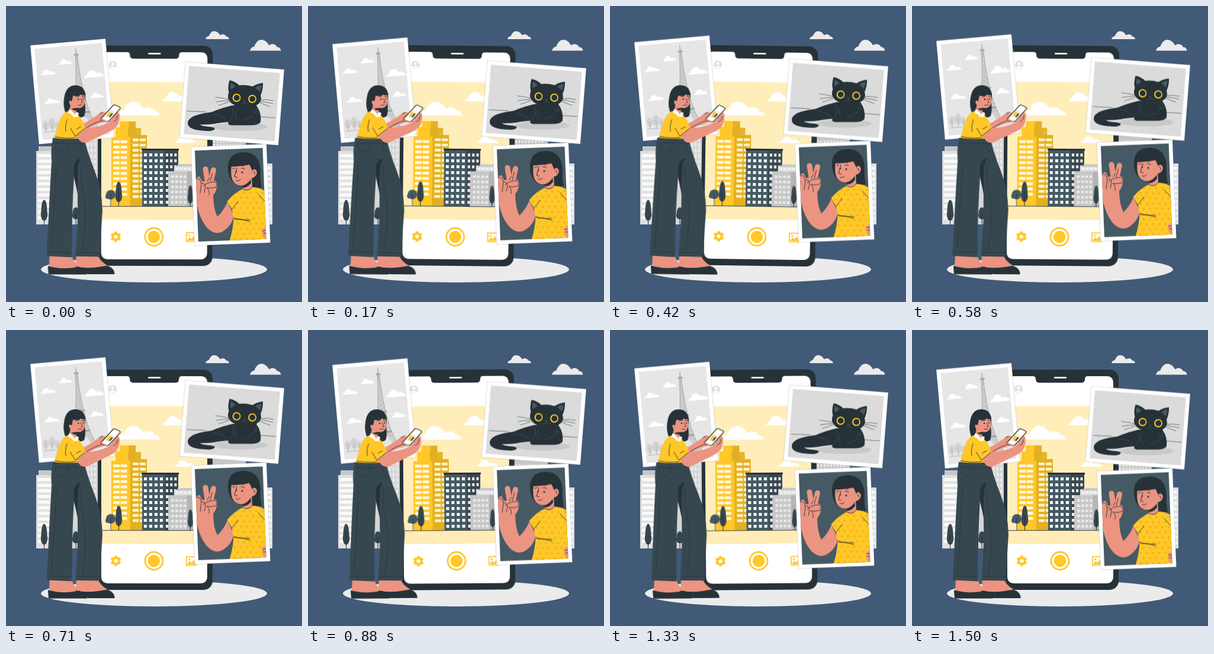
An HTML page that plays this animation: 500 by 500 pixels, repeating every 1.54 s.

```html
<!DOCTYPE html>
<html lang="en">
<head>
<meta charset="utf-8">
<title>Photo sharing</title>
<style>
  html, body { margin: 0; width: 100%; height: 100%; overflow: hidden; background: #415a78; }
  svg { display: block; width: 100%; height: 100%; }
  .ln { fill: none; stroke: #263238; stroke-width: .9; stroke-linecap: round; stroke-linejoin: round; }
  #phone { transform-origin: 252px 253px; }
  #woman { transform-origin: 131px 294px; }
</style>
</head>
<body>
<svg id="stage" viewBox="0 0 500 500"></svg>
<script>
const INK = '#263238', SLATE = '#37474f', STEEL = '#455a64', YEL = '#ffc727', GOLD = '#e3b022';
const SKIN = '#eb9481', PALE = '#ebebeb', GREY = '#e0e0e0', MID = '#c7c7c7';

const path = (d, fill, extra = '') => `<path d="${d}" fill="${fill}" ${extra}/>`;
const rect = (x, y, w, h, fill, extra = '') =>
  `<rect x="${x}" y="${y}" width="${w}" height="${h}" fill="${fill}" ${extra}/>`;
const dot = (x, y, r, fill, ry = r) => `<ellipse cx="${x}" cy="${y}" rx="${r}" ry="${ry}" fill="${fill}"/>`;
const line = (d, stroke = INK, w = .9) => `<path class="ln" d="${d}" style="stroke:${stroke};stroke-width:${w}"/>`;

// rows and columns of equal windows
function grid(x, y, cols, rows, dx, dy, w, h, fill) {
  let d = '';
  for (let r = 0; r < rows; r++)
    for (let c = 0; c < cols; c++) d += `M${x + c * dx} ${y + r * dy}h${w}v${h}h${-w}z`;
  return path(d, fill);
}

// cloud in a box with its base at y
const cloud = (x, y, w, h, fill) => path(
  'M0 1Q.03 .68 .14 .62Q.22 .02 .36 0Q.52 0 .62 .52Q.68 .36 .76 .4Q.85 .45 .87 .66Q.98 .66 1 1Z',
  fill, `transform="translate(${x} ${y - h}) scale(${w} ${h})"`);

const tree = (x, y, rx, ry, base, fill = SLATE) =>
  dot(x, y, rx, fill, ry) + dot(x, y + ry * .4, rx * 1.15, fill, ry * .62) + line(`M${x} ${y}V${base}`, INK, 1);

// white print with a clipped picture; content uses stage coordinates
function photo(id, x, y, w, h, angle, fill, content) {
  const turn = `transform="translate(${x} ${y}) rotate(${angle})"`;
  const inner = rect(6.7, 6.5, w - 13.4, h - 13, fill, turn);
  return `<g class="float"><clipPath id="${id}">${inner}</clipPath>
    ${rect(0, 0, w, h, '#fff', turn + ' stroke="#263238" stroke-opacity=".3" stroke-width=".5"')}
    ${inner}<g clip-path="url(#${id})">${content}</g></g>`;
}

function backdrop() {
  return cloud(337, 56, 40, 13.5, PALE) + cloud(412, 75.5, 52.5, 18.5, PALE) +
    rect(55, 237, 60, 10, MID) + rect(51, 245, 70, 124, GREY) +
    grid(54, 250, 1, 12, 1, 9.5, 44, 5.5, '#fafafa') +
    rect(112, 215, 50, 154, '#d6d6d6') + grid(137, 222, 4, 15, 6, 9.5, 3, 6, PALE) +
    tree(64.5, 345, 5, 17.5, 369) + tree(118, 350, 5.5, 10, 369) +
    rect(345, 215, 60, 154, MID) + grid(350, 227, 9, 2, 5.5, 6, 3, 4, PALE) +
    rect(405, 266, 45, 103, GREY) + grid(438, 271, 1, 10, 1, 9.5, 9.5, 5.5, '#fafafa') +
    dot(250, 445, 191, PALE, 22);
}

function city() {
  return cloud(188, 185, 72, 23, '#fff') + cloud(264, 161, 46, 16, '#fff') + cloud(285, 231, 36, 11, '#fff') +
    rect(192, 195, 15, 30, YEL) + rect(207, 195, 12, 30, GOLD) +
    rect(185, 205, 21, 20, YEL) + rect(206, 206, 22, 20, GOLD, 'opacity=".9"') +
    rect(178, 221, 33, 117.5, YEL) + rect(210, 218, 28, 120.5, GOLD) +
    grid(181, 227, 2, 11, 12.5, 8.9, 11, 4.8, '#fff8e2') +
    grid(214, 224, 2, 12, 12, 8.7, 10, 4.6, '#fff3cc') +
    rect(230, 242, 42, 96.5, STEEL) + rect(268, 242, 23, 96.5, SLATE) + rect(229, 241, 63, 3, INK) +
    grid(233, 249, 4, 9, 9, 10, 5, 5, '#fafafa') + grid(270, 249, 3, 9, 7.2, 10, 4, 5, PALE) +
    rect(284, 270, 36, 69, GREY) + rect(290, 267, 30, 4, MID) + rect(274, 279, 32, 59.5, MID) + rect(306, 279, 14, 59.5, '#b5b5b5') +
    grid(279, 286, 4, 6, 7, 8.7, 4.5, 4, PALE) + grid(287, 273, 4, 1, 7, 6, 4.5, 3, '#f5f5f5') +
    dot(177, 319, 8, STEEL) + dot(172, 322, 4, STEEL) + line('M177 318V338') +
    tree(190.5, 314, 5, 17, 338) + tree(311.5, 318, 4, 15, 338) +
    line('M162 338.6H340', INK, .9);
}

function gear(x, y) {
  let teeth = '';
  for (let a = 0; a < 360; a += 60)
    teeth += rect(x - 2.4, y - 8.8, 4.8, 5, YEL, `rx="1" transform="rotate(${a} ${x} ${y})"`);
  return teeth + `<circle cx="${x}" cy="${y}" r="5" fill="none" stroke="${YEL}" stroke-width="3.8"/>`;
}

function phone() {
  return `<g id="phone">` +
    rect(155, 67, 194, 372, INK, 'rx="15"') +
    path('M173 78H204Q209 78 209 83Q209 89 215 89H286Q292 89 292 83Q292 78 297 78H329Q340 78 340 90V416Q340 428 328 428H173Q161 428 161 416V90Q161 78 173 78Z', '#fff') +
    line('M241 80.5H260', '#fff', 2.4) +
    dot(180, 100, 7, GREY) + dot(180, 98, 2.5, '#fff') + path('M175 104.5Q180 99.5 185 104.5Q180 108 175 104.5Z', '#fff') +
    rect(161, 128.5, 179, 232.5, '#ffeeba') + rect(161, 339, 179, 22, '#ffecb6') +
    city() + gear(185.6, 390) +
    `<circle cx="250" cy="390" r="15" fill="none" stroke="${YEL}" stroke-width="2.8"/>` + dot(250, 390, 10.3, YEL) +
    rect(305, 383, 16, 14.5, 'none', `stroke="${YEL}" stroke-width="1.8"`) +
    path('M306 396L310.5 390L313.5 393.5L317 388L321 396Z', YEL) + dot(309.5, 387.5, 1.7, YEL) + '</g>';
}

function tower() {
  let lattice = '';
  for (let y = 30; y < 128; y += 7) {
    const w = 2 + Math.pow((y - 20) / 130, 2) * 19, v = 2 + Math.pow((y - 13) / 130, 2) * 19;
    lattice += `M${76 - w} ${y}L${76 + v} ${y + 7}M${76 + w} ${y}L${76 - v} ${y + 7}`;
  }
  return path('M75.4 12H76.6L77.5 20Q79 70 86 104Q92 132 104 150H92Q87 128 76 127Q65 128 60 150H48Q60 132 66 104Q73 70 74.5 20Z', '#cfcfcf') +
    line(lattice, '#b0b0b0', .6) +
    line('M76 12V30M74.5 22Q73 70 66 104Q60 132 50 149M77.5 22Q79 70 86 104Q92 132 102 149', '#a3a3a3', .8) +
    rect(72, 21, 8, 3, '#a6a6a6') + rect(67, 85, 18, 3, '#a6a6a6') + rect(61, 119, 30, 3.5, '#a6a6a6');
}

function travel() {
  return `<g transform="translate(41 66.5) rotate(-5.05)">` +
    cloud(13, 52, 26, 9, '#fff') + cloud(45, 37, 23, 9, '#fff') + cloud(86, 63, 34, 12, '#fff') +
    cloud(15, 101, 27, 9, '#fff') + cloud(93, 98, 23, 9, '#fff') + tower() +
    dot(14, 137, 5, '#d2d2d2', 8) + dot(25, 135, 6, '#d2d2d2', 9) + dot(34, 139, 4, '#d2d2d2', 7) +
    line('M10 148.5H112M14 136V148M25 134V148M34 138V148', '#a6a6a6', .7) + '</g>';
}

function cat() {
  const eye = (x, y) => dot(x, y, 6.9, YEL) + dot(x + .2, y, 5, INK);
  return line('M306 177.5L338 179M429 187L455 189', INK, .6) + dot(396, 204, 46, '#c9c9c9', 7) +
    // body, then tail
    path('M332 187Q352 175 382 168L423 168Q432 181 430 196Q427 201.500 412 201.500H380Q373 200 376 196Q361 197 352 199Q338 201 326 200Z', INK) +
    path('M350 179Q309 183 307 197Q306 210 338 211Q351 212 353 207Q350 204 343 204Q328 203 327 199Q332 192 350 190Z', INK) +
    path('M377.500 125.500Q374 138 376.500 146Q371 159 385 167Q402 175 420 169Q434 163 430 151Q434.500 141 434 130Q424 131 416.500 136Q404 132.500 394 134Q387 127 377.500 125.500Z', INK) +
    path('M379.500 130Q378 137 380 141L388 135.500Q384 131.500 379.500 130ZM431.500 134Q425 134.500 421 138L429 145Q431.500 139 431.500 134Z', STEEL) +
    line('M382 172Q388 184 378 194M424 172Q420 188 401 193M350 183Q368 184 373 194M389 177Q385 186 390 192M417 177Q421 182 425 179', STEEL, .7) +
    eye(389.5, 155) + eye(416, 157) +
    path('M400.500 160L405 160.300L402.500 162.800Z', STEEL) + line('M402.500 163Q401 167 397.500 165M402.500 163Q404 167 408 165.500', STEEL, .7) +
    line('M376 158Q366 155 354 154M376 160Q365 160 355 162M377 162Q367 165 359 168M429 159Q440 157 452 160M429 161Q440 162 451 165M428 163Q437 167 446 170', INK, .6);
}

function selfie() {
  const shirt = 'M373.500 330Q385 316 400 309Q409 315 416 306Q428 306 438 313L442 399H377Q384 376 384.500 358Q382 350 382 344Z';
  let stars = '';
  for (let r = 0; r < 10; r++)
    for (let c = 0; c < 8; c++) {
      const x = 381 + c * 10.5 + (r % 2) * 5.2, y = 315 + r * 8.7;
      stars += `M${x} ${y - 2.2}l.7 1.5 1.600 .2-1.200 1.100.3 1.600-1.400-.8-1.400.8.3-1.600-1.200-1.100 1.600-.2z`;
    }
  return path('M375 276Q373 247 403 247Q427 248 430 276Q429 294 432 307H416L400 305Q377 302 375 276Z', INK) +
    path('M402 296L415 288L416 306Q409 315 400 310Z', SKIN) + path('M400 303Q409 300 413 292L414 299Q408 307 400 307Z', INK) +
    path('M382 262Q378 285 383 295Q389 304.500 399 303.500Q409 301 414 291Q423 289 424 281Q422 273 415 277L412 264Z', SKIN) +
    path('M378 271Q379 250 403 248Q420 252 417 279L411 268Q395 272 378 271Z', INK) +
    line('M390 274L386 288L390.500 289.500M389 295Q393 296.500 396 293M383 275L387 273.500M397 274Q400 273 403 275.500M418 280Q421 279 420 284M401 271Q398 262 400 254', INK, 1) +
    dot(389, 280, 1.2, INK) + dot(399, 281, 1.6, INK) +
    path('M321 317Q322 354 340 375Q352 387 364 382Q381 373 385 354L374 331Q367 347 357 356Q350 342 350 317Z', SKIN) +
    line('M341 301L337 275.500M345 301L350.500 277', SKIN, 9) +
    path('M321 297Q321 288 327 288L331 296L353 295Q359 299 356 307Q354 317 347 322Q335 328 322 321Q318 310 321 297Z', SKIN) +
    line('M345 296L348.500 283M340 296L343.500 290M323 292Q328 289 330 301L328 316M331 299Q336 299 337 306L335 315M333 304Q341 297 353 297Q358 300 355 306Q347 309 339 307Q345 312 343 319') +
    path(shirt, YEL) + `<clipPath id="top"><path d="${shirt}"/></clipPath><g clip-path="url(#top)">${path(stars, GOLD)}</g>` +
    line('M400 309Q409 315 416 306M382 343Q388 336 392 330M384.500 358Q397 362 412 361M387 360Q400 360 412 364M426 318L438 331') +
    path('M445 374Q435 373 432 378Q431 382 435 384Q431 388 436 392L445 394Z', SKIN) + line('M445 377L434 380M444 384H435');
}

function handset() {
  return path('M181 167.500Q182.500 166.500 184 167L191.500 170.500Q193.500 171.500 192.500 173.500L174 194Q172.500 195.500 170.500 195L162.500 191.500Q160.500 190.500 162 188.500Z', '#fff', `stroke="${INK}" stroke-width="1.3"`) +
    path('M175.500 175L184 179L174.500 190L167 186.500Z', '#ffeeba') +
    path('M174 178L177 179.500L172.500 187L169.500 185.500Z', YEL) + path('M178 180.500L181 182L176 188L173.500 186.500Z', STEEL);
}

function woman() {
  return `<g id="woman">` +
    // feet
    path('M74 419H111Q112 432 125 440Q120 446 98 446Q82 445 73 441Z', SKIN) + path('M119 419H155Q157 430 172 438.500Q150 447 118 440Z', SKIN) +
    path('M71 441Q71 438 74 440Q95 446 124 440.500Q134 445 137 451V453.500H72Z', INK) +
    path('M118 440Q140 445 171 438.500Q182 442 183.500 450V453H138Q134 445 118 443Z', INK) +
    // trousers
    path('M79 223L131.500 222Q137 246 150 279Q162 309 163 345Q160 390 159 423.500L117.500 423Q122 370 121 318Q118 298 115 286Q111 350 111.500 424.500L69 422.500Q73 330 77 262Q75 243 79 223Z', SLATE) +
    path('M126 258Q117 258 114.500 272L115 290L121 316Q120 292 122 268Z', INK) +
    line('M82 232H130M84 234Q82 249 96 247Q105 246 104 233M129 234Q123 241 130 246M72 415.500L111 417M119 416L159 417M77 409Q82 330 85 270M127 268Q124 290 133 330Q137 370 129 413', INK, .7) +
    // back arm
    path('M130 199Q147 190 158 181Q164 177 168 180L172 191Q164 197 152 200L134 209Z', SKIN) + line('M134 207Q150 196 163 193M158 182L163 179') +
    // hair, face and neck
    path('M102 184Q95 171 98 155Q101 134 117 134Q133 134 134 152L133 164Q135 177 132 186Q127 190 118 187L108 172L107 182Z', INK) +
    path('M109 163L119 170L118 183Q113 189 107 178Z', SKIN) +
    path('M112 149H132Q134.500 161 131.500 167.500Q127 174 119 172Q113 170 111.500 168Q106 167 106.500 161Q108 158 111 160Z', SKIN) +
    path('M110.500 173Q114 173.500 119 172L118.500 176.500Q113 177 110.500 173Z', INK) +
    path('M104 158Q107 142 118 137Q134 139 134 151L127 150.500L126 149L124 151.500Q118 153 113 151.500L111 161Z', INK) +
    line('M126 157L129.500 162.500L126.500 164M122 167.500Q125 168.500 128 167M118 153.500L123 152.500M128 152.500L131.500 153.500') +
    dot(122, 157.5, 1.2, INK) + dot(130, 157, 1.1, INK) +
    // shirt
    path('M103 178Q92 184 88 200L81 223Q106 226 131 223L133 206Q133 198 122 184Z', YEL) +
    path('M107 174L104 180Q111 182 115 189Q117 182 113 179ZM118.500 179L123 181L120 188L115 187Z', '#fff') +
    line('M103 192Q99 203 101 212M121 219Q112 211 109 206M83 221Q105 225 118 222') +
    // front arm and handset
    path('M117 218L133 206Q155 206 173 197Q182 190 184 181L190 179Q193 186 191 194Q189 204 179 210L140 229Q131 234 124 227Z', SKIN) +
    path('M119 188Q134 200 133 207L117 220L109 207Z', YEL) + line('M133 207L117 220L109 207M119 208L126 204') +
    path('M184 181Q190 177 192 184Q191 196 184 201L176 199Q172 196 178 192Z', SKIN) + handset() +
    path('M160 188Q158 194 163 195L170 197L171 194.500L165 192Z', SKIN) +
    line('M188 185Q189 192 182 195M160 189Q159 194 165 195') + '</g>';
}

document.getElementById('stage').innerHTML = rect(0, 0, 500, 500, '#415a78') + backdrop() + phone() +
  photo('p1', 41, 66.5, 127.5, 167.7, -5.05, '#e6e6e6', travel()) +
  photo('p2', 303, 94.2, 167.5, 128.4, 4.45, '#dbdbdb', cat()) +
  photo('p3', 312, 238, 128.1, 167, -2.24, STEEL, selfie()) + woman();

const timing = { duration: 1540, delay: -40, iterations: Infinity, easing: 'linear' };
const sway = [[0, 0], [.25, 1], [.75, -1], [1, 0]].map(([offset, a]) => ({ offset, transform: `rotate(${a}deg)` }));
const float = [.5, -9.5, .5].map(y => ({ transform: `translateY(${y}px)` }));
document.querySelectorAll('#phone, #woman').forEach(el => el.animate(sway, timing));
document.querySelectorAll('.float').forEach(el => el.animate(float, timing));
</script>
</body>
</html>
```
